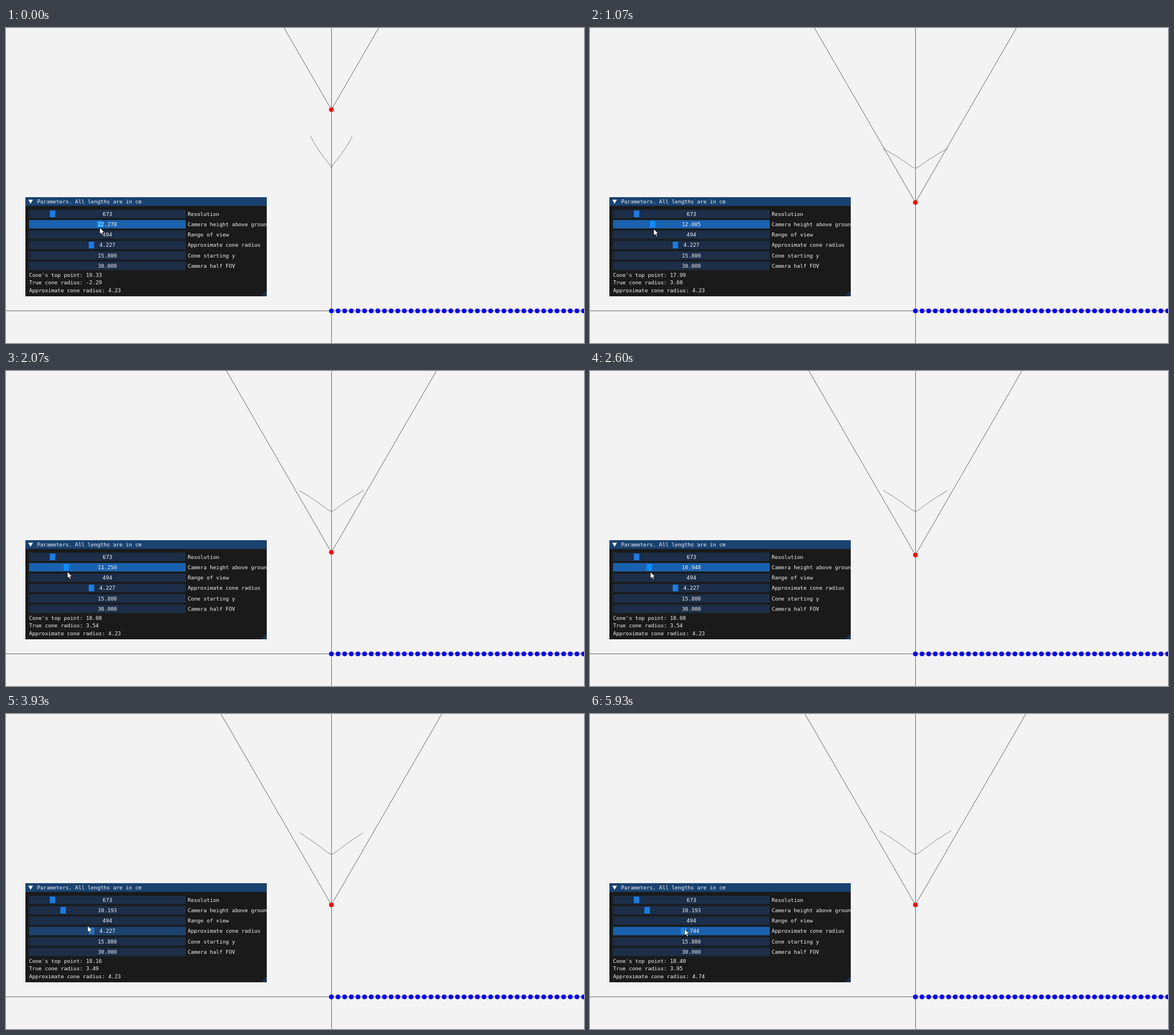
These frames come from a looping animation (1013 by 553 pixels, 6 s). An HTML page:

```html
<!DOCTYPE html>
<html lang="en">
<head>
<meta charset="utf-8">
<title>Mirror cone parameters</title>
<style>
  html, body { margin: 0; width: 100%; height: 100%; overflow: hidden; background: #f3f3f3; }
  svg { display: block; }
  text { font: 9.22px "DejaVu Sans Mono", monospace; fill: #f4f4f4; white-space: pre; }
  .mid { text-anchor: middle; }
  .line { fill: none; stroke: #6a6a6a; stroke-width: 1; }
  .bar { fill: #1c2e48; }
  .bar.hover { fill: #1d436f; }
  .bar.active { fill: #1a62ae; }
  .grab { fill: #1a7ce2; }
  .grab.active { fill: #0b8cff; }
</style>
</head>
<body>
<svg id="stage" width="1013" height="553" viewBox="0 0 1013 553">
  <path class="line" d="M570.5 0V553M0 496.5H1013"/>
  <path class="line" id="fov"/>
  <path class="line" id="mirror"/>
  <g id="dots" fill="#00f"></g>
  <circle id="camera" cx="570.3" r="4.1" fill="#f00"/>
  <svg x="34" y="297" width="423" height="174" viewBox="34 297 423 174">
    <rect x="34" y="297" width="423" height="174" fill="#1a1a1a"/>
    <rect x="34" y="297" width="423" height="15.3" fill="#1a4270"/>
    <path d="M39 301.5H47.2L43.1 308.6Z" fill="#fff"/>
    <path d="M457 460.5V471H446.5Z" fill="#1b314e"/>
    <text x="54.5" y="308.3">Parameters. All lengths are in cm</text>
    <g id="rows"></g>
    <text id="top" x="40.4" y="436.9"></text>
    <text id="radius" x="40.4" y="450.3"></text>
    <text id="approx" x="40.4" y="463.8"></text>
  </svg>
  <path id="cursor" d="M.5 .5V12.6L3.3 10 5.2 14.4 7.3 13.5 5.4 9.2H9.2Z" fill="#fff" stroke="#000" stroke-width=".9"/>
</svg>
<script>
const NS = "http://www.w3.org/2000/svg";
const $ = id => document.getElementById(id);
const LOOP = 6000, FRAMES = 90;
const CX = 570.3, GROUND = 496.7, SCALE = 15.86;
const COUNT = 673, RANGE = 494, START_Y = 15.8;
const TAN_FOV = Math.tan(Math.PI / 6);

function add(parent, tag, attrs, label) {
  const el = document.createElementNS(NS, tag);
  for (const name in attrs) el.setAttribute(name, attrs[name]);
  if (label) el.textContent = label;
  return parent.appendChild(el);
}

// Tracks: [frame, value, ...] points, linear between them
const heightTrack = [[0, 80], [9, 26], [10, 26], [15, 13], [21, 7], [38, 7], [39, 5], [40, 3], [41, 1], [42, 0]];
const radiusTrack = [[78, 0], [88, 18]];
const cursorTrack = [
  [0, 163.6, 349.7], [9, 121.6, 352], [10, 121.6, 352], [15, 111.7, 352], [21, 107, 351.7],
  [38, 107, 351.7], [39, 105.3, 352], [42, 101.3, 352], [45, 101.3, 352], [47, 101.5, 353.3],
  [48, 101.5, 353.3], [54, 110, 377], [56, 110, 377], [59, 142.4, 371], [66, 151, 376],
  [67, 151, 376], [68, 152, 377], [69, 152, 377], [74, 148.7, 372.7], [78, 148.7, 372.7], [88, 165, 376.7]
];

function sample(track, k, col = 1) {
  if (k <= track[0][0]) return track[0][col];
  for (let i = 1; i < track.length; i++) {
    const a = track[i - 1], b = track[i];
    if (k <= b[0]) return a[col] + (b[col] - a[col]) * (k - a[0]) / (b[0] - a[0]);
  }
  return track[track.length - 1][col];
}

// Slider values move in whole mouse pixels
const heightAt = k => 10.1926 + 0.15107 * Math.round(sample(heightTrack, k));
const radiusAt = k => 4.227 + 0.0287 * Math.round(sample(radiusTrack, k));

const rows = [
  ["Resolution", "673", true],
  ["Camera height above ground", "", true],
  ["Range of view", "494"],
  ["Approximate cone radius", "", true],
  ["Cone starting y", "15.800"],
  ["Camera half FOV", "30.000"]
].map(([label, value, slider], i) => {
  const y = 326.3 + i * 18.25, g = $("rows");
  return {
    bar: add(g, "rect", { class: "bar", x: 40.3, y: y - 7.4, width: 274.7, height: 14.8 }),
    grab: slider && add(g, "rect", { class: "grab", x: 76.8, y: y - 5.9, width: 9.6, height: 11.8 }),
    value: add(g, "text", { class: "mid", x: 177.7, y: y + 3.4 }, value),
    label: add(g, "text", { x: 318.4, y: y + 3.4 }, label)
  };
});
for (let i = 0; i < 39; i++) add($("dots"), "circle", { cx: CX + i * 11.63, cy: GROUND, r: 4.1 });

function setRow(i, value, x) {
  rows[i].value.textContent = value.toFixed(3);
  rows[i].grab.setAttribute("x", x - 4.8);
}

function rowState(k, i) {
  if (i === 1) return k < 46 ? "active" : k < 47 ? "hover" : "";
  if (i === 2) return k >= 49 && k < 54 ? "hover" : "";
  if (i === 3) return k >= 79 ? "active" : k >= 54 ? "hover" : "";
  return "";
}

// Each step follows the mirror that sends ray i to ground point i
function traceMirror(h, r) {
  const step = r / COUNT, pts = [[0, START_Y]];
  let x = 0, y = START_Y;
  for (let i = 1; i <= COUNT; i++) {
    const gx = i * RANGE / COUNT - x;
    const c = Math.hypot(x, h - y) || 1, g = Math.hypot(gx, y);
    const nx = -x / c + gx / g, ny = (h - y) / c - y / g;
    const n = Math.hypot(nx, ny) || 1;
    x -= ny / n * step;
    y += nx / n * step;
    pts.push([x, y]);
  }
  return pts;
}

function side(pts, sign) {
  return "M" + pts.map(([x, y]) =>
    (CX + sign * x * SCALE).toFixed(2) + " " + (GROUND - y * SCALE).toFixed(2)).join("L");
}

function draw(k) {
  const h = heightAt(k), r = radiusAt(k);
  const camY = GROUND - h * SCALE, spread = camY * TAN_FOV;
  // The mirror is recomputed one frame after the height changes
  const pts = traceMirror(heightAt(k - 1), r);
  const [endX, endY] = pts[COUNT];

  $("camera").setAttribute("cy", camY);
  $("fov").setAttribute("d", `M${CX - spread} 0L${CX} ${camY}L${CX + spread} 0`);
  $("mirror").setAttribute("d", side(pts, 1) + side(pts, -1));
  setRow(1, h, 45.8 + 5.325 * h);
  setRow(3, r, 149.7 + 28 * (r - 4.227));
  rows.forEach((row, i) => {
    const state = rowState(k, i);
    row.bar.setAttribute("class", "bar " + state);
    if (row.grab) row.grab.setAttribute("class", "grab " + state);
  });
  $("top").textContent = "Cone's top point: " + endY.toFixed(2);
  $("radius").textContent = "True cone radius: " + endX.toFixed(2);
  $("approx").textContent = "Approximate cone radius: " + r.toFixed(2);
  $("cursor").setAttribute("transform",
    `translate(${sample(cursorTrack, k, 1)} ${sample(cursorTrack, k, 2)})`);
}

// Fifteen frames a second, on a 10 ms clock
const startOf = k => Math.round(k * 20 / 3) * 10;
let shown = -1;
function tick() {
  const t = performance.now() % LOOP;
  let k = FRAMES - 1;
  while (k > 0 && startOf(k) > t) k--;
  if (k !== shown) draw(shown = k);
  requestAnimationFrame(tick);
}
tick();
</script>
</body>
</html>
```
